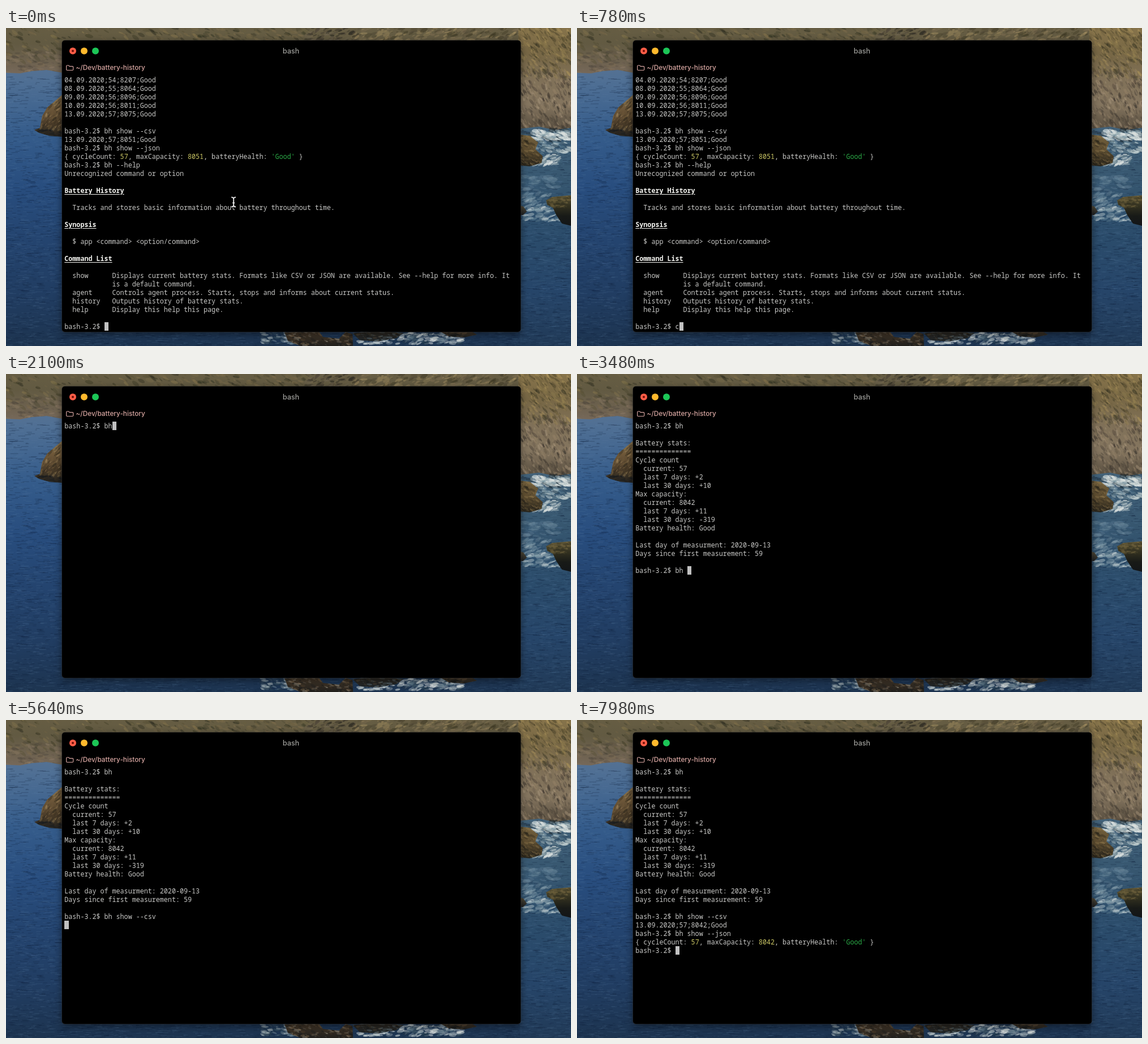
Animation of 998 by 561 pixels, one loop 8000 ms. Source, as an HTML page with a canvas:

```html
<!DOCTYPE html>
<html lang="en">
<head>
<meta charset="utf-8">
<title>Battery history</title>
<style>
  html, body { margin: 0; width: 100%; height: 100%; overflow: hidden; background: #1c3450; }
  #stage { position: absolute; left: 0; top: 0; width: 998px; height: 561px; overflow: hidden; }
  #stage > * { position: absolute; }
  canvas { left: 0; top: 0; }
  #window { left: 98.5px; top: 22px; width: 810px; height: 513.5px; border-radius: 5px;
    background: #000; box-shadow: 0 0 0 .5px #2a2a2a, 0 4px 14px rgba(0, 0, 0, .5); }
  #chrome { left: 0; top: 0; }
  .label { margin: 0; white-space: pre; font-family: Inter, sans-serif; line-height: 16px; }
  #title { left: 403.5px; width: 200px; top: 33px; text-align: center; font-size: 12.6px; font-weight: 500; color: #9c9c98; }
  #path { left: 123.5px; top: 62px; font-size: 11.8px; font-weight: 500; color: #d6a5a0; }
  #term { margin: 0; left: 103.3px; top: 83.5px; white-space: pre; color: #c8c8c6;
    font: 500 11.71px/15.03px "Noto Sans Mono", "DejaVu Sans Mono", monospace; font-variant-ligatures: none; }
  #term u { font-weight: 700; color: #f4f4f0; text-underline-offset: 2px; text-decoration-thickness: 1px; }
  #term i { font-style: normal; color: #cbc765; }
  #term em { font-style: normal; color: #2bab47; }
  #term s { display: inline-block; width: 7.5px; height: 15px; vertical-align: top; background: #c1c1c1; }
  #pointer { left: 394px; top: 296px; fill: none; }
</style>
</head>
<body>
<div id="stage">
  <canvas id="scene" width="998" height="561"></canvas>
  <div id="window"></div>
  <svg id="chrome" width="998" height="561">
    <circle cx="118" cy="40.5" r="6" fill="#ff5d47"/>
    <circle cx="118" cy="40.5" r="2" fill="#6b0f08"/>
    <circle cx="138" cy="40.5" r="6" fill="#ffb92d"/>
    <circle cx="158" cy="40.5" r="6" fill="#1cc657"/>
    <path d="M106.7 74V67.2q0-1.2 1.2-1.2h2.8l1.5 1.6h5.3q1.2 0 1.2 1.2V73.3q0 1.2-1.2 1.2h-9.6q-1.2 0-1.2-1.2z"
      fill="none" stroke="#d6a5a0" stroke-width="1.2"/>
  </svg>
  <p id="title" class="label">bash</p>
  <p id="path" class="label">~/Dev/battery-history</p>
  <pre id="term"></pre>
  <svg id="pointer" width="16" height="22">
    <defs><path id="beam" d="M4 2.5q3.5 0 4 2.2q.5-2.2 4-2.2M8 4.5V17.5M4 19.5q3.5 0 4-2.2q.5 2.2 4 2.2M6 12.5h4"/></defs>
    <use href="#beam" stroke="#111" stroke-width="4"/>
    <use href="#beam" stroke="#f2f2f2" stroke-width="1.7"/>
  </svg>
</div>
<script>
const LOOP = 8000;
const PROMPT = 'bash-3.2$ ';

// ---------- wallpaper ----------
const ctx = document.getElementById('scene').getContext('2d');
let seed = 17;
const rand = (lo = 0, hi = 1) => {
  seed = (seed * 16807) % 2147483647;
  return lo + (hi - lo) * seed / 2147483647;
};

function verticalFill(x, y, w, h, colors) {
  const g = ctx.createLinearGradient(0, y, 0, y + h);
  colors.forEach((c, i) => g.addColorStop(i / (colors.length - 1), c));
  ctx.fillStyle = g;
  ctx.fillRect(x, y, w, h);
}

// Scatters soft tilted flecks over a box.
function flecks(count, x, y, w, h, colors, size, tilt, alpha = .5) {
  for (let i = 0; i < count; i++) {
    const long = size * rand(.3, 1.3);
    ctx.globalAlpha = alpha * rand(.4, 1);
    ctx.fillStyle = colors[Math.floor(rand(0, colors.length))];
    ctx.beginPath();
    ctx.ellipse(x + rand(0, w), y + rand(0, h), long, long * rand(.2, .5), tilt + rand(-.35, .35), 0, 7);
    ctx.fill();
  }
  ctx.globalAlpha = 1;
}

// Thin, nearly level ripples.
function ripples(count, x, y, w, h) {
  for (let i = 0; i < count; i++) {
    ctx.fillStyle = i % 2 ? 'rgba(14,32,56,.3)' : 'rgba(96,130,165,.17)';
    ctx.fillRect(x + rand(-8, w), y + rand(0, h), rand(3, 14), 1);
  }
}

function shape(points, paint) {
  ctx.save();
  ctx.clip(new Path2D('M' + points + 'Z'));
  paint();
  ctx.restore();
}

function drawScene() {
  verticalFill(0, 0, 998, 561, ['#66788e', '#4f6f94', '#355c8b', '#284d7e', '#24446f', '#213d62', '#1d3450']);
  verticalFill(908, 170, 90, 391, ['#44637a', '#36566f', '#2b4c6b', '#264569', '#213a57']);
  ripples(1500, 0, 84, 100, 477);
  ripples(1200, 908, 180, 90, 381);
  ripples(700, 98, 534, 810, 27);

  // Hills on the left and along the top
  shape('0 0 998 0 998 40 100 40 100 79 72 74 45 76 25 80 0 79', () => {
    verticalFill(0, 0, 998, 82, ['#665d43', '#625a42', '#6b604d', '#77695a']);
    flecks(260, 0, 0, 340, 60, ['#8e7c50', '#34341f', '#554e34', '#29291d', '#7a6947'], 6, .5);
    flecks(90, 0, 42, 100, 38, ['#8e7b66', '#594f43', '#7e6d54', '#4b443a'], 6, .15);
    flecks(160, 340, 0, 200, 24, ['#2f3021', '#69603f', '#45412d', '#806f4c'], 5, .4);
    flecks(100, 530, 0, 90, 24, ['#28261f', '#4a4235', '#6f6553'], 5, -.3, .7);
    flecks(280, 610, 0, 388, 24, ['#a08c60', '#4a4331', '#817053', '#b09867', '#37321f'], 6, -.4);
  });

  // Cliff on the right
  shape('905 0 998 0 998 176 970 180 942 174 905 178', () => {
    verticalFill(900, 0, 100, 180, ['#86734a', '#776745', '#807158', '#84755f', '#564c3e']);
    flecks(350, 905, 0, 95, 88, ['#b2985f', '#453e27', '#70623f', '#2f2f20', '#94804f'], 5, .9);
    flecks(420, 905, 75, 95, 105, ['#ac997e', '#4d4338', '#7c6c56', '#958267', '#322d27'], 5, 1.1);
  });

  // Rock in the bay
  shape('50 180 60 176 64 155 73 140 84 131 99 118 99 192 76 190 59 185', () => {
    verticalFill(50, 115, 50, 80, ['#8f7851', '#6d5739', '#4b3c29', '#1e1e1c']);
    flecks(190, 50, 118, 50, 62, ['#a88d60', '#3b301f', '#755f3d', '#262219'], 4, -.9);
    flecks(50, 50, 180, 50, 12, ['#171b1e', '#28251f'], 4, .1, .8);
  });

  // Surf and rocks on the right
  flecks(80, 908, 177, 92, 26, ['#23313a', '#38454a', '#182228'], 5, .2, .65);
  flecks(130, 932, 180, 66, 18, ['#d8dfdd', '#9db2b8', '#edf0ec'], 6, .2, .65);
  flecks(80, 930, 200, 68, 20, ['#718e9e', '#cfdad8', '#2d4556'], 6, .3, .6);
  flecks(70, 930, 222, 48, 20, ['#c5d2d2', '#edf0ec', '#68818c'], 5, -.3, .65);
  shape('905 188 925 190 940 202 935 214 948 226 946 238 925 244 905 242', () => {
    verticalFill(905, 185, 45, 60, ['#77643f', '#5c4c30', '#25221a']);
    flecks(170, 905, 187, 45, 55, ['#9a8153', '#211e17', '#6c5937'], 4, .5);
  });
  flecks(50, 910, 262, 62, 24, ['#65849a', '#87a0ae'], 8, .1, .3);
  flecks(80, 912, 290, 50, 28, ['#7794a5', '#4e6f86', '#a0b4bc'], 6, -.35, .4);
  flecks(100, 914, 316, 66, 24, ['#a9bdc3', '#6c8c9d', '#d7e0de', '#3e5e76'], 6, -.2, .55);
  shape('905 312 914 315 920 324 912 331 905 329', () => verticalFill(905, 310, 16, 20, ['#5c523d', '#1e2123']));
  shape('954 304 965 298 998 295 998 349 982 345 972 330 966 317 956 312', () => {
    verticalFill(950, 295, 50, 55, ['#645a38', '#333120', '#181a17', '#121518']);
    flecks(90, 955, 297, 45, 20, ['#857447', '#333120', '#5a5032'], 4, .1);
  });

  // Shoreline below the window
  flecks(150, 452, 537, 100, 20, ['#a9b7ba', '#4c687c', '#dde3e0', '#253b4d'], 6, .15, .55);
  flecks(230, 625, 538, 180, 19, ['#c7d1d1', '#5d7787', '#e4e9e6', '#253b4d'], 6, -.15, .6);
  shape('492 537 552 535 560 545 588 548 600 536 612 540 613 561 520 561 498 552', () => {
    verticalFill(490, 535, 130, 26, ['#46392a', '#211f1c']);
    flecks(190, 490, 535, 125, 26, ['#806a4c', '#11171b', '#4b3c2b', '#9a9182'], 4, .2);
  });
  shape('612 538 660 535 702 538 690 547 655 553 625 551', () => {
    verticalFill(610, 535, 95, 20, ['#2e2921', '#1c2227']);
    flecks(70, 610, 535, 95, 18, ['#5b4c37', '#12181b', '#687b83'], 4, .1);
  });
  shape('768 536 822 535 832 541 808 546 782 544', () => {
    verticalFill(765, 535, 70, 12, ['#46392a', '#202120']);
    flecks(50, 765, 535, 70, 12, ['#705b40', '#171a1b'], 4, 0);
  });
}

// ---------- terminal ----------
const json = capacity =>
  `{ cycleCount: <i>57</i>, maxCapacity: <i>${capacity}</i>, batteryHealth: <em>'Good'</em> }\n`;

const help = `04.09.2020;54;8207;Good
08.09.2020;55;8064;Good
09.09.2020;56;8096;Good
10.09.2020;56;8011;Good
13.09.2020;57;8075;Good

${PROMPT}bh show --csv
13.09.2020;57;8051;Good
${PROMPT}bh show --json
${json(8051)}${PROMPT}bh --help
Unrecognized command or option

<u>Battery History</u>

  Tracks and stores basic information about battery throughout time.

<u>Synopsis</u>

  $ app &lt;command&gt; &lt;option/command&gt;

<u>Command List</u>

  show      Displays current battery stats. Formats like CSV or JSON are available. See --help for more info. It
            is a default command.
  agent     Controls agent process. Starts, stops and informs about current status.
  history   Outputs history of battery stats.
  help      Display this help this page.

`;

const stats = `${PROMPT}bh

Battery stats:
==============
Cycle count
  current: 57
  last 7 days: +2
  last 30 days: +10
Max capacity:
  current: 8042
  last 7 days: +11
  last 30 days: -319
Battery health: Good

Last day of measurment: 2020-09-13
Days since first measurement: 59

`;
const csv = `${stats}${PROMPT}bh show --csv\n13.09.2020;57;8042;Good\n`;
const final = `${csv}${PROMPT}bh show --json\n${json(8042)}`;

// Each step: start time, text above the prompt, text typed so far.
const steps = [];
const show = (time, above, input = '') => steps.push([time, above, input]);
const type = (time, gap, above, before, text) =>
  [...text].forEach((_, i) => show(time + i * gap, above, before + text.slice(0, i + 1)));

const FIRST_KEY = 720;
show(0, help);
type(FIRST_KEY, 120, help, '', 'clear');
show(1440, '');
type(1860, 180, '', '', 'bh');
show(2340, '', 'bh\n');
show(2760, stats);
type(3120, 150, stats, '', 'bh ');
type(3660, 180, stats, 'bh ', 'show --csv');
show(5580, stats, 'bh show --csv\n');
show(5940, csv);
show(6120, csv, 'bh show --csv');
show(6300, csv, 'bh show --cs');
show(6420, csv, 'bh show --c');
show(6540, csv, 'bh show --');
type(6660, 120, csv, 'bh show --', 'json');
show(7260, csv, 'bh show --json\n');
show(7620, final);

const term = document.getElementById('term');
const pointer = document.getElementById('pointer');
let current = null;

function render(time) {
  const step = steps.findLast(([start]) => start <= time);
  if (step === current) return;
  current = step;
  const [, above, input] = step;
  term.innerHTML = above + PROMPT + input + '<s></s>';
  pointer.style.display = time < FIRST_KEY ? '' : 'none';
}

const begin = performance.now();
function tick() {
  render((performance.now() - begin) % LOOP);
  requestAnimationFrame(tick);
}

drawScene();
tick();
</script>
</body>
</html>
```
